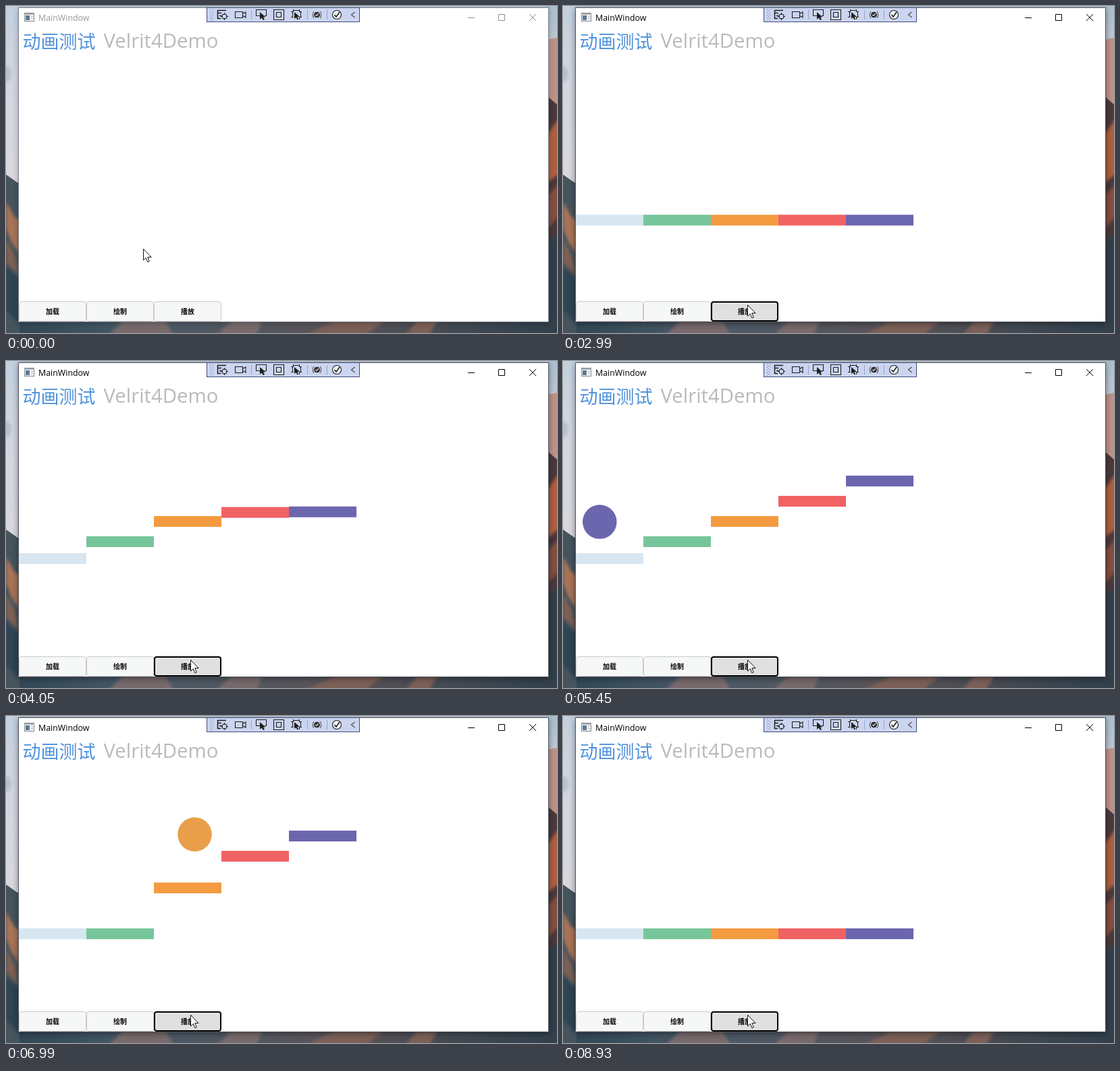
An HTML page that plays this animation: 816 by 485 pixels, repeating every 9.46 s.

```html
<!DOCTYPE html>
<html lang="zh">
<head>
<meta charset="utf-8">
<title>MainWindow</title>
<style>
html, body { margin: 0; width: 100%; height: 100%; overflow: hidden; background: #33495a; }
svg { display: block; width: 816px; height: 485px; }
text { font-family: "Open Sans", "Noto Sans", sans-serif; }
.cjk { font-family: "Noto Sans CJK SC", "Noto Sans CJK", "Noto Sans", sans-serif; }
.ico { fill: none; stroke: #1e1e1e; stroke-width: 1.1; }
</style>
</head>
<body>
<svg viewBox="0 0 816 485" xmlns="http://www.w3.org/2000/svg">
  <defs>
    <linearGradient id="skyL" x2="0" y2="1">
      <stop offset="0" stop-color="#c3d0de"/><stop offset=".4" stop-color="#d2d6e0"/><stop offset="1" stop-color="#d9d8dd"/>
    </linearGradient>
    <linearGradient id="skyR" x2="0" y2="1">
      <stop offset="0" stop-color="#a9bfd0"/><stop offset="1" stop-color="#c3c9d2"/>
    </linearGradient>
    <linearGradient id="ground" x2="1" y2="0">
      <stop offset="0" stop-color="#2f4654"/><stop offset=".25" stop-color="#4a5a68"/>
      <stop offset=".6" stop-color="#5a5458"/><stop offset="1" stop-color="#2f404d"/>
    </linearGradient>
    <filter id="blur" x="-5%" y="-5%" width="110%" height="110%"><feGaussianBlur stdDeviation="5"/></filter>
    <filter id="soft" x="-5%" y="-5%" width="110%" height="110%"><feGaussianBlur stdDeviation="2"/></filter>
    <clipPath id="client"><rect x="19" y="30" width="784" height="438"/></clipPath>
    <path id="arrow" d="M0 0V16.5L3.8 13 6.3 19.2 8.8 18.2 6.3 12H11.6Z"/>
  </defs>

  <!-- wallpaper -->
  <rect width="816" height="485" fill="url(#ground)"/>
  <rect width="816" height="4" fill="#b9c8d6"/>
  <rect width="20" height="262" fill="url(#skyL)"/>
  <rect x="802" width="14" height="60" fill="url(#skyR)"/>
  <path d="M0 250L20 264V485H0Z" fill="#46545e"/>
  <path d="M802 50L816 47V150H802Z" fill="#bd9389"/>
  <path d="M802 134L816 146V485H802Z" fill="#4b393c"/>
  <g filter="url(#soft)">
    <ellipse cx="0" cy="101" rx="8" ry="12" fill="#b6bfce"/>
    <path d="M0 290L12 312 20 318V368L8 350 0 330Z" fill="#a87356"/>
    <path d="M0 345L14 372 20 400 0 380Z" fill="#7e6052"/>
    <path d="M0 385L20 405V470L0 452Z" fill="#2d4552"/>
    <path d="M802 190L820 165V248L802 262Z" fill="#ad603f"/>
    <path d="M802 282L820 262V310L802 330Z" fill="#84503f"/>
    <path d="M802 348L820 335V490H802Z" fill="#30404c"/>
    <path d="M150 490L175 466H235L250 490ZM310 490L335 466H380L370 490Z" fill="#786a6c"/>
    <path d="M440 490L490 466H560L530 490ZM590 490L610 466H640L625 490Z" fill="#7c6058"/>
  </g>

  <!-- window -->
  <rect id="shadow" x="18" y="4" width="786" height="467" filter="url(#blur)"/>
  <rect id="frame" x="18.5" y="2.5" width="785" height="466" fill="#fff"/>
  <rect x="27.5" y="10.5" width="14" height="12" fill="#f4f5f6" stroke="#83888d"/>
  <path d="M27 12H42" stroke="#a8adb2" stroke-width="2"/>
  <rect x="29" y="14" width="6" height="7" fill="#5c7894"/>
  <path d="M37 15.5H40M37 18.5H40" stroke="#a9b0b6"/>
  <text id="title" x="48" y="22" font-size="12.4">MainWindow</text>
  <path id="controls" fill="none" d="M684 17.5H694M729.5 12.5H738.5V21.5H729.5ZM775 12L785 22M785 12L775 22"/>
  <text class="cjk" x="24.5" y="62.5" font-size="27" fill="#5092dc">动画测试</text>
  <text x="144.500" y="62" font-size="29.300" fill="#bababa">Velrit4Demo</text>

  <!-- debug toolbar -->
  <rect x="297.5" y="2.5" width="226" height="21" fill="#ccd5f0" stroke="#3f4c7c"/>
  <path d="M302.5 5V22M306.5 5V22M304.5 7V22" stroke="#6c7aa5" stroke-dasharray="1 3"/>
  <path d="M363.5 6V20M446.5 6V20M475.5 6V20" stroke="#97a4cb"/>
  <g class="ico">
    <path d="M313 6.5H326M313.5 6V19M313 10.5H319M316 14.5H319M313 18.5H318" stroke-width="1.5"/>
    <circle cx="323.5" cy="15.5" r="3.5"/>
    <path d="M323.5 10V13M323.5 18V21M318 15.5H321M326 15.5H329"/>
    <path d="M339.5 8.5H350.5V17.5H339.5ZM350.5 11.5L355 9V17L350.5 14.5"/>
    <path d="M376 14.5H370.5V5.5H385.5V14.5H383"/>
    <path d="M396.5 5.5H411.5V20.5H396.5ZM400.5 9.5H407.5V16.5H400.5Z"/>
    <path d="M425.5 5V8.5H422M434.5 5V8.5H438M425.5 6.5H434.5M422 16.5H425.5M438 16.5H434.5V20M424.5 8V16M436.5 8V16"/>
    <path d="M456 8Q452.500 13 456 18M465 8Q468.500 13 465 18" stroke="#555"/>
    <circle cx="460.5" cy="13" r="3.8" fill="#333"/>
    <path d="M458.5 13L460 14.5 463 11" stroke="#fff"/>
    <circle cx="490" cy="13" r="6.5" fill="#f2f4fa"/>
    <path d="M486.500 13L489 16 494 9" stroke-width="1.6"/>
    <path d="M516.5 9L511.5 13 516.5 17" stroke="#444"/>
  </g>
  <path d="M376 9V20L378.5 17.5 381 21 383 20 381 16.5H384.5ZM427 9V19L429.500 17 431.5 20.5 433 19.5 431.5 16H435Z" fill="#1e1e1e"/>

  <g id="buttons"></g>
  <g clip-path="url(#client)">
    <g id="bars"></g>
    <circle id="ball" r="25.3"/>
  </g>
  <use id="cursor" href="#arrow" fill="#fff" stroke="#111" stroke-width="1"/>
</svg>
<script>
const LOOP = 9460, STEP = 200 / 3, RISE_AT = 2990;
const FLOOR = 315;
const COLORS = [[216, 230, 241], [119, 198, 155], [244, 155, 65], [241, 98, 100], [108, 102, 174]];
const TOPS = [285, 260, 230, 200, 170];
const LANDINGS = [5558, 6207, 6908, 7560, 8212];
const BALL_IN = 5130, BALL_OUT = 8900;

// each hop: start time, end time, start point, end point, control height
const HOPS = [
  [BALL_IN, 5558, 0, 255, 69, 259.5, 221],
  [5558, 6207, 69, 259.5, 169, 234.5, 169],
  [6207, 6908, 169, 234.5, 269, 204.5, 147],
  [6908, 7560, 269, 204.5, 369, 174.5, 117],
  [7560, 8212, 369, 174.5, 469, 144.5, 87],
  [8212, 8864, 469, 144.5, 569, 144, 81]
];
// cursor stops: time, x, y
const TRAIL = [
  [185, 203, 360], [450, 160, 398], [720, 76, 452], [1255, 76, 452],
  [1455, 190, 437], [1590, 273, 442], [1780, 273, 443]
];

const $ = id => document.getElementById(id);
const NS = 'http://www.w3.org/2000/svg';
function set(el, attrs) {
  for (const key in attrs) el.setAttribute(key, attrs[key]);
}
function add(parent, name, attrs) {
  const el = document.createElementNS(NS, name);
  set(el, attrs);
  return parent.appendChild(el);
}
const clamp = v => Math.min(1, Math.max(0, v));
const mix = (a, b, p) => a + (b - a) * p;
const rgb = c => `rgb(${c.map(Math.round)})`;

const bars = COLORS.map((c, i) => add($('bars'), 'rect', {
  x: 19 + i * 100, width: 100, height: 16, fill: rgb(c)
}));
const buttons = ['加载', '绘制', '播放'].map((label, i) => {
  const rect = add($('buttons'), 'rect', {});
  add($('buttons'), 'text', {
    class: 'cjk', x: 69 + i * 100, y: 457, 'font-size': 10,
    'font-weight': 700, 'text-anchor': 'middle', fill: '#000'
  }).textContent = label;
  return rect;
});

function bezier(a, b, c, d, u) {
  const v = 1 - u;
  return a * v * v * v + 3 * b * u * v * v + 3 * c * u * u * v + d * u * u * u;
}

function barTop(i, t) {
  if (t < RISE_AT) return FLOOR;
  const speed = i === 3 ? 0.0872 : 0.088;
  const y = Math.max(TOPS[i], 309.6 - speed * (t - RISE_AT));
  return Math.min(FLOOR, y + 0.207 * Math.max(0, t - LANDINGS[i]));
}

function drawBall(t) {
  const shown = t >= BALL_IN && t < BALL_OUT;
  $('ball').style.display = shown ? '' : 'none';
  if (!shown) return;
  const n = HOPS.findLastIndex(h => t >= h[0]);
  const [t0, t1, x0, y0, x1, y1, high] = HOPS[n];
  const u = clamp((t - t0) / (t1 - t0)), lean = (x1 - x0) / 4;
  // the ball takes on the colour of the bar it has just touched
  const old = COLORS[(n + 3) % 5], next = COLORS[(n + 4) % 5];
  const p = n ? clamp((t - t0) / 90) : 1;
  set($('ball'), {
    cx: bezier(x0, x0 + lean, x1 - lean, x1, u),
    cy: bezier(y0, high, high, y1, u),
    fill: rgb(next.map((c, k) => mix(old[k], c, p)))
  });
}

function drawCursor(t) {
  let i = 0;
  while (i < TRAIL.length - 2 && t >= TRAIL[i + 1][0]) i++;
  const [ta, xa, ya] = TRAIL[i], [tb, xb, yb] = TRAIL[i + 1];
  const p = clamp((t - ta) / (tb - ta));
  const x = Math.round(mix(xa, xb, p)), y = Math.round(mix(ya, yb, p));
  $('cursor').setAttribute('transform', `translate(${x + 0.5} ${y + 0.5})`);
  return [x, y];
}

function drawButtons(t, [x, y]) {
  const focus = t < 850 ? -1 : t < 1910 ? 0 : 2;
  const hover = y >= 436 && y < 468 ? Math.floor((x - 19) / 100) : -1;
  buttons.forEach((rect, i) => {
    const on = i === focus, inset = on ? 1 : 0.5;
    set(rect, {
      x: 19 + i * 100 + inset, y: 438 + inset,
      width: 100 - 2 * inset, height: 30 - 2 * inset, rx: 3,
      fill: i === hover ? '#e0e0e0' : '#f6f8f7',
      stroke: on ? '#000' : '#c9c9c9', 'stroke-width': on ? 2 : 1
    });
  });
}

function drawWindow(active) {
  $('title').setAttribute('fill', active ? '#000' : '#999');
  $('controls').setAttribute('stroke', active ? '#000' : '#8e8e8e');
  $('frame').setAttribute('stroke', active ? '#4f5560' : '#767c86');
  $('shadow').setAttribute('opacity', active ? 0.42 : 0.25);
}

function render(ms) {
  // the screen refreshes fifteen times a second
  const t = RISE_AT + Math.floor((ms - RISE_AT + 12) / STEP) * STEP;
  drawWindow(t >= 850);
  drawButtons(t, drawCursor(t));
  $('bars').style.display = t >= 970 ? '' : 'none';
  bars.forEach((bar, i) => bar.setAttribute('y', barTop(i, t)));
  drawBall(t);
}

const start = performance.now();
function tick() {
  render((performance.now() - start) % LOOP);
  requestAnimationFrame(tick);
}
tick();
</script>
</body>
</html>
```
